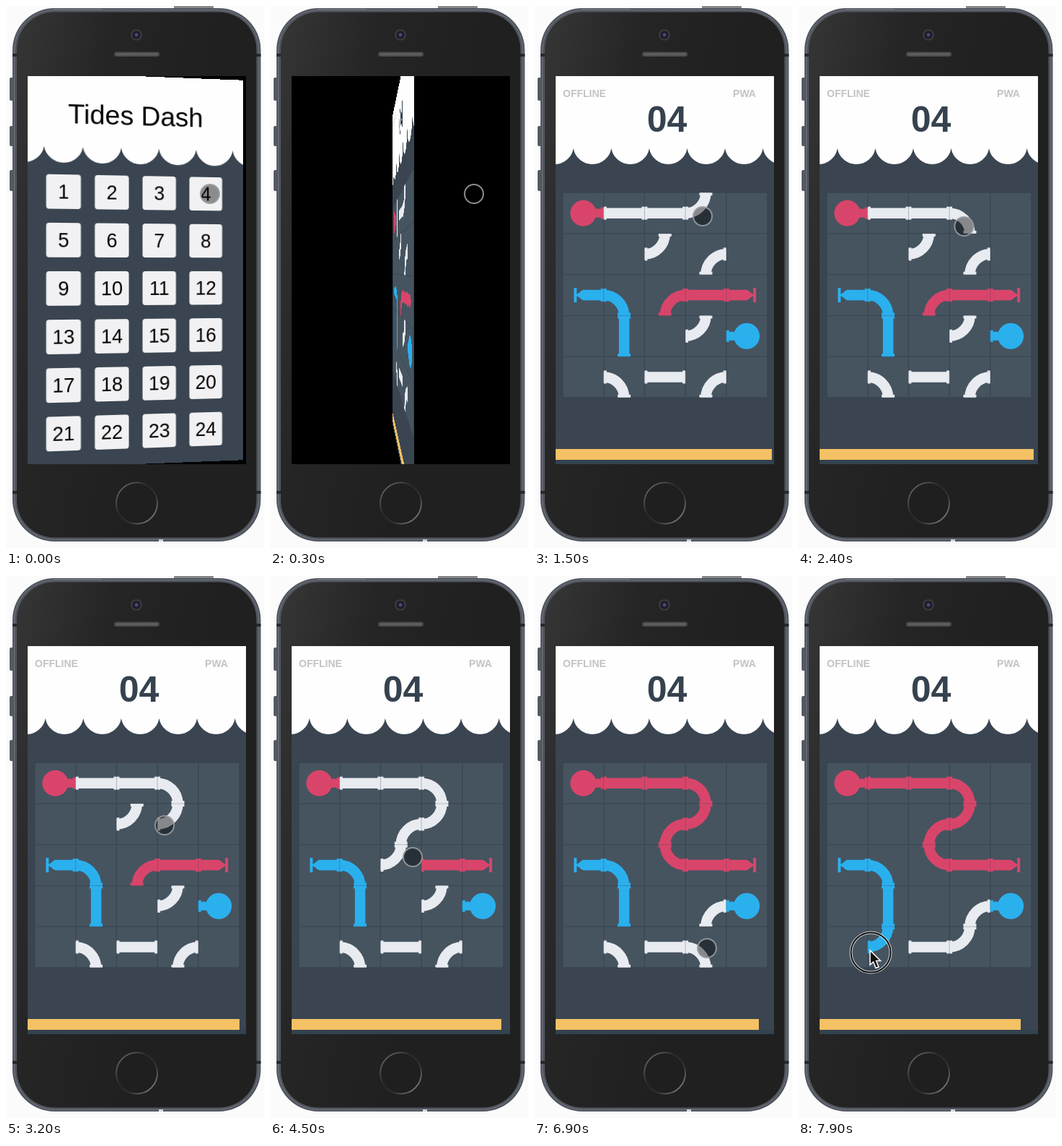
These frames come from a looping animation (358x750 px, 8000 ms). An HTML page:

```html
<!DOCTYPE html>
<html lang="en">
<head>
<meta charset="utf-8">
<title>Pipe puzzle</title>
<style>
  html, body { margin: 0; width: 100%; height: 100%; overflow: hidden; background: #fbfbfb; }
  svg { position: absolute; left: 0; top: 0; display: block; }
  #screen { position: absolute; left: 30px; top: 97px; width: 303px; height: 537px; overflow: hidden; background: #000; perspective: 600px; }
  text { font-family: "Liberation Sans", Arial, sans-serif; text-anchor: middle; }
  .label { font-weight: bold; font-size: 14px; fill: #c2c3c5; }
</style>
</head>
<body>
<svg width="358" height="750">
  <defs>
    <linearGradient id="face" x1="0" y1="0.1" x2="0.7" y2="0.4">
      <stop offset="0" stop-color="#343434"/><stop offset=".45" stop-color="#252525"/><stop offset="1" stop-color="#202020"/>
    </linearGradient>
    <linearGradient id="shine"><stop offset="0" stop-color="#565b63"/><stop offset="1" stop-color="#c9cbcd"/></linearGradient>
    <linearGradient id="home" x1="0" y1="0" x2="1" y2="1">
      <stop offset="0" stop-color="#777"/><stop offset=".4" stop-color="#2a2a2a"/><stop offset=".65" stop-color="#333"/><stop offset="1" stop-color="#999"/>
    </linearGradient>
  </defs>
  <rect x="233" y="0" width="55" height="6" rx="1" fill="#85878a"/>
  <g fill="#555a62">
    <rect x="5" y="99" width="6" height="32" rx="2"/>
    <rect x="5" y="166" width="6" height="28" rx="2"/>
    <rect x="5" y="227" width="6" height="29" rx="2"/>
  </g>
  <rect x="9" y="3" width="344.500" height="738" rx="58" fill="#50555e"/>
  <rect x="11.500" y="5.500" width="339.500" height="733" rx="56" fill="none" stroke="#70757d"/>
  <path d="M66 4.500H145" stroke="url(#shine)" stroke-width="3"/>
  <path d="M66 4.500h67v.1" stroke="#6b7077" fill="none"/>
  <path d="M212 739.500h6" stroke="#d5d6d7" stroke-width="3"/>
  <path d="M9 68h7M347 68h6.500M9 673h7M347 673h6.500" stroke="#25282c" stroke-width="4"/>
  <rect x="15" y="8.500" width="332.500" height="727" rx="52" fill="url(#face)"/>
  <circle cx="181" cy="40" r="8" fill="#39393c"/>
  <circle cx="181" cy="40" r="5.500" fill="#1d1b2b"/>
  <circle cx="181" cy="40" r="2.500" fill="#484675"/>
  <rect x="150" y="63.500" width="63" height="6.500" rx="3.200" fill="#4b4b4b"/>
  <path d="M153 66.800H211" stroke="#707070" stroke-width="3" stroke-dasharray="1 1"/>
  <circle cx="181.500" cy="688" r="28.500" fill="#1f1f1f" stroke="url(#home)" stroke-width="2"/>
</svg>

<div id="screen">
  <svg id="menu" viewBox="30 97 303 537" width="303" height="537"></svg>
  <svg id="game" viewBox="30 97 303 537" width="303" height="537"></svg>
</div>

<svg width="358" height="750">
  <circle id="touch" r="13" fill="rgba(0,0,0,.42)" stroke="rgba(150,154,158,.9)" stroke-width="2"/>
  <g id="pointer" transform="translate(101 521)" fill="none">
    <circle r="27.500" stroke="#fff" stroke-width="4" stroke-opacity=".75"/>
    <circle r="27.500" stroke="#111" stroke-width="2"/>
    <path d="M-1-3V17L3.500 13 7 21.500 11 20 7.500 11.500H13.500Z" fill="#111" stroke="#fff" stroke-width="1.500"/>
  </g>
</svg>

<script>
const $ = id => document.getElementById(id);
const LOOP = 8000, CELL = 56.7, HALF = CELL / 2, LEFT = 40, TOP = 258.3;
const WHITE = '#e8ebf0', PINK = '#d9456a', BLUE = '#2bb0ee';

// Openings: 0 right, 1 down, 2 left, 3 up
const OPENINGS = { elbow: [2, 3], straight: [0, 2], valve: [0], ball: [0] };
const BOARD = [
  ['ball', 0, 0, 0, PINK], ['straight', 1, 0, 1], ['straight', 2, 0, 0], ['elbow', 3, 0, 0],
  ['elbow', 2, 1, 0], ['elbow', 3, 1, 2],
  ['valve', 0, 2, 0, BLUE], ['elbow', 1, 2, 3], ['elbow', 2, 2, 2], ['straight', 3, 2, 0], ['valve', 4, 2, 2, PINK],
  ['straight', 1, 3, 1], ['elbow', 3, 3, 0], ['ball', 4, 3, 2, BLUE],
  ['elbow', 1, 4, 3], ['straight', 2, 4, 0], ['elbow', 3, 4, 2]
];
// Column, row, then the times of the quarter turns
const TAPS = [
  [1, 0, 1100], [3, 0, 1600, 1900, 2200], [3, 1, 2700, 3000], [2, 1, 3400, 3700],
  [2, 2, 4000, 4300, 4600], [3, 3, 5200, 5500, 5700, 6100, 6300, 6500],
  [3, 4, 6900, 7200], [1, 4, 7600]
];
// Time, x, y
const PATH = [
  [0, 283, 260], [800, 283, 260], [1100, 128, 288], [1200, 128, 288], [1500, 234, 291], [2300, 234, 291],
  [2600, 220, 345], [3200, 220, 345], [3400, 190, 345], [3700, 190, 345], [3950, 198, 389], [4700, 198, 389],
  [5100, 247, 451], [6600, 247, 451], [6850, 240, 515], [7300, 240, 515], [7600, 101, 521], [LOOP, 101, 521]
];

const smooth = u => (u = Math.min(1, Math.max(0, u)), u * u * (3 - 2 * u));
const range = n => [...Array(n).keys()];

const flange = `<path d="M${HALF - 4} 0h4" stroke-width="18"/>`;
const flanges = dirs => dirs.map(d => `<g transform="rotate(${d * 90})">${flange}</g>`).join('');
const SHAPES = {
  straight: `<path d="M${-HALF} 0H${HALF}"/>` + flanges([0, 2]),
  elbow: `<path d="M${-HALF} 0A${HALF} ${HALF} 0 0 0 0 ${-HALF}"/>` + flanges([2, 3]),
  ball: `<circle r="18" fill="currentColor" stroke="none"/><path d="M10 0H${HALF}" stroke-width="12"/>
    <path d="M${HALF - 4} 0h4" stroke-width="16"/>`,
  valve: `<path d="M-11-10V10" stroke-width="4"/><path d="M-10 0H0" stroke-width="3"/>
    <path d="M-8-1.500L-1-7H5V7H-1L-8 1.500Z" fill="currentColor" stroke="none"/><path d="M0 0H${HALF}"/>` + flanges([0])
};

const waves = `<path d="M30 97H333V197H317.700${range(6).map(i =>
  `A26.700 26.700 0 0 1 ${317.7 - 52.6 * (i + 1)} 197`).join('')}V97Z" fill="#fefefe"/>
  <path d="M317.700 197A26.700 26.700 0 0 0 370.300 197V190H317.700Z" fill="#fefefe"/>`;
const back = '<rect x="30" y="97" width="303" height="537" fill="#3a4551"/>' + waves;

$('menu').innerHTML = back + '<text x="181" y="165" font-size="37.500">Tides Dash</text>' +
  range(24).map(i => {
    const x = 81 + 66 * (i % 4), y = 258.6 + 66 * (i / 4 | 0);
    return `<rect x="${x - 23.5}" y="${y - 23.5}" width="47" height="47" rx="4" fill="#f1f1f3"/>
      <text x="${x}" y="${y + 9}" font-size="27">${i + 1}</text>`;
  }).join('');

const size = CELL * 5;
const lines = range(6).map(i => `M${LEFT + i * CELL} ${TOP}v${size}M${LEFT} ${TOP + i * CELL}h${size}`).join('');
$('game').innerHTML = back + `
  <text class="label" x="70" y="126">OFFLINE</text><text class="label" x="292" y="126">PWA</text>
  <text x="184.500" y="174" font-size="50" font-weight="bold" fill="#36424e">04</text>
  <rect x="${LEFT}" y="${TOP}" width="${size}" height="${size}" fill="#465460"/>
  <path d="${lines}" stroke="#3b4753" fill="none"/>
  <g id="pipes" fill="none" stroke="currentColor" stroke-width="14.500"></g>
  <path d="${lines}" stroke="#3b4753" stroke-opacity=".3" fill="none"/>
  <rect x="30" y="628" width="303" height="6" fill="#33434e"/>
  <rect id="bar" x="30" y="613" height="15" fill="#f4c165"/>`;

const pieces = BOARD.map(([type, col, row, turn, color]) => {
  const el = document.createElementNS('http://www.w3.org/2000/svg', 'g');
  el.innerHTML = SHAPES[type];
  $('pipes').append(el);
  const times = (TAPS.find(t => t[0] === col && t[1] === row) || []).slice(2);
  return { type, col, row, turn, color, times, el };
});

function flow(piece, color) {
  piece.wet = color;
  for (const d of piece.open) {
    const col = piece.col + [1, 0, -1, 0][d], row = piece.row + [0, 1, 0, -1][d];
    const next = pieces.find(p => p.col === col && p.row === row);
    if (next && !next.wet && next.open.includes((d + 2) % 4)) flow(next, color);
  }
}

function drawPipes(t) {
  for (const p of pieces) {
    p.now = p.turn + p.times.filter(time => time <= t).length;
    p.open = OPENINGS[p.type].map(d => (d + p.now) % 4);
    p.wet = null;
  }
  pieces.filter(p => p.type === 'valve').forEach(p => flow(p, p.color));
  for (const p of pieces) {
    const x = LEFT + (p.col + .5) * CELL, y = TOP + (p.row + .5) * CELL;
    p.el.setAttribute('transform', `translate(${x} ${y}) rotate(${p.now * 90})`);
    p.el.style.color = p.color || p.wet || WHITE;
  }
}

function drawTouch(t) {
  const i = PATH.findIndex(k => k[0] > t);
  const [t0, x0, y0] = PATH[i - 1], [t1, x1, y1] = PATH[i];
  const u = smooth((t - t0) / (t1 - t0));
  $('touch').setAttribute('cx', x0 + (x1 - x0) * u);
  $('touch').setAttribute('cy', y0 + (y1 - y0) * u);
  const arrow = t >= 7700;
  $('touch').style.display = arrow ? 'none' : '';
  $('pointer').style.display = arrow ? '' : 'none';
}

function frame(now) {
  const t = Math.floor(now % LOOP / 100) * 100;
  const angle = 180 * smooth((t + 71) / 714);
  $('menu').style.display = angle < 90 ? '' : 'none';
  $('game').style.display = angle < 90 ? 'none' : '';
  $('menu').style.transform = `rotateY(${angle}deg)`;
  $('game').style.transform = angle < 180 ? `rotateY(${angle - 180}deg)` : 'none';
  $('bar').setAttribute('width', 303 - 3 * Math.max(0, Math.floor((t - 160) / 880)));
  drawPipes(t);
  drawTouch(t);
  requestAnimationFrame(() => frame(performance.now()));
}
frame(performance.now());
</script>
</body>
</html>
```
